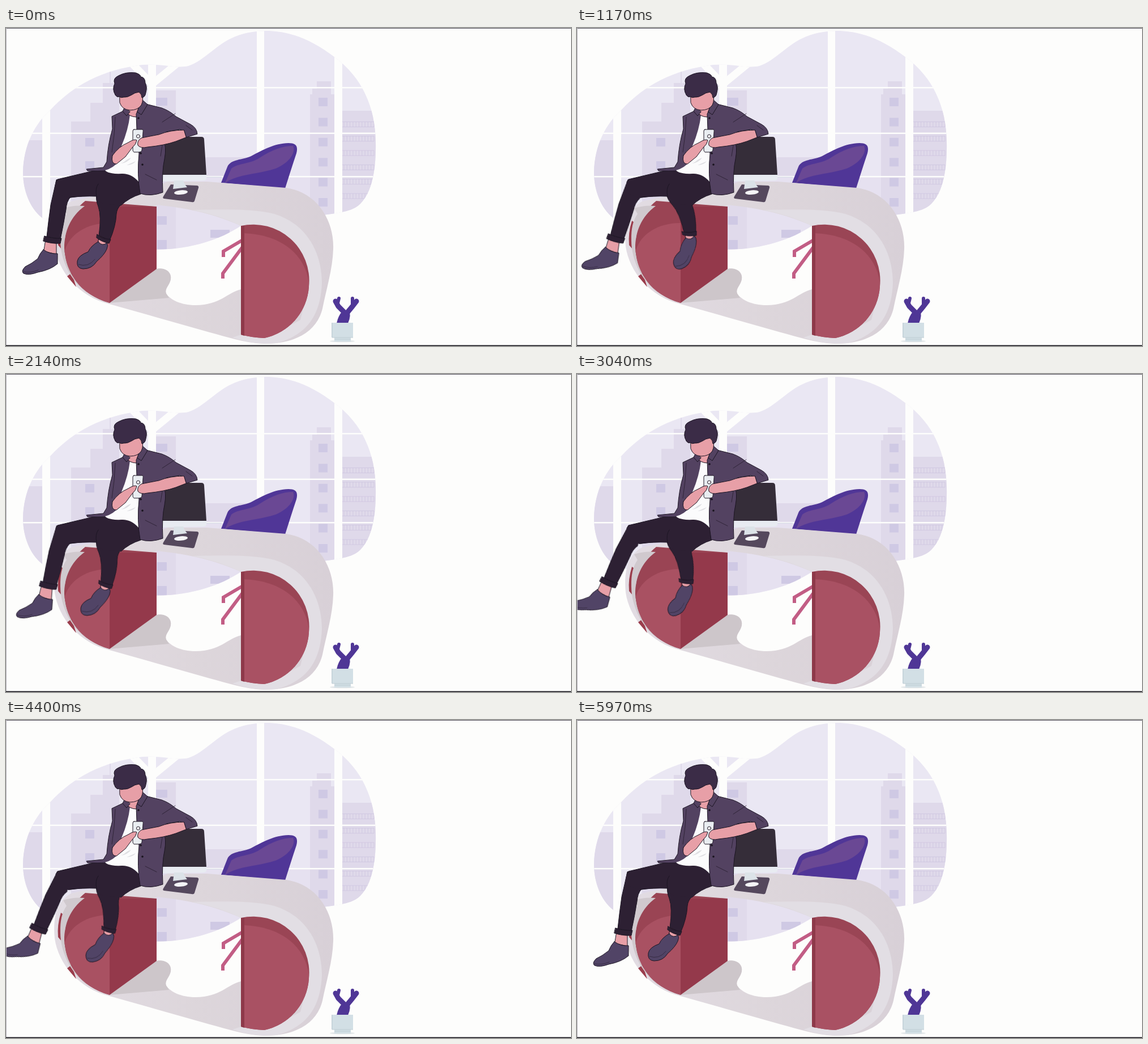
Write an HTML page that moves like this. It is 998 px wide and 561 px high and loops after 6 s.

```html
<!DOCTYPE html>
<html lang="en">
<head>
<meta charset="utf-8">
<title>Man on a desk</title>
<style>
html, body { margin: 0; width: 100%; height: 100%; overflow: hidden; background: #fdfdfc; }
svg { display: block; width: 998px; height: 561px; }
.ink { stroke: #1c1523; stroke-width: 1; stroke-linejoin: round; stroke-linecap: round; }
.line { fill: none; }
.pants { fill: #2d2033; }
.skin { fill: #e79fa7; }
.shoe { fill: #514466; }
.coat { fill: #534261; }
.win { fill: #cfc9e4; }
#far { transform-origin: 91px 275px; }
#near { transform-origin: 160px 298px; }
</style>
</head>
<body>
<svg viewBox="0 0 998 561">
  <defs>
    <clipPath id="cloud">
      <path d="M64 335C42 318 30 286 30 255C31 205 52 168 78 145C120 100 170 74 240 65C275 62 300 72 322 67C350 58 372 28 405 15C425 7 445 5 465 5C510 7 545 25 580 51C630 88 652 140 653 200C654 245 648 288 626 310C616 320 602 324 575 328L415 349C380 372 330 390 267 391L183 380Z"/>
    </clipPath>
    <linearGradient id="top" x1="0" x2="1">
      <stop offset="0" stop-color="#e2dce3"/>
      <stop offset=".5" stop-color="#ddd6db"/>
      <stop offset="1" stop-color="#d8d0d7"/>
    </linearGradient>
  </defs>

  <g clip-path="url(#cloud)">
    <path fill="#eae7f3" d="M0 0H700V420H0Z"/>
    <g fill="#dfd9ea">
      <path d="M30 198H64V340H30Z"/>
      <path d="M115 165H149V132H171V97H183V75H185V97H200V400H115Z"/>
      <path d="M265 110H300V228H443V262H300V400H265Z"/>
      <path d="M537 117H541V107H549V94H574V117H580V340H537Z"/>
      <path d="M594 146H660V330H594Z"/>
      <path d="M200 262H537V400H200Z" opacity=".45"/>
    </g>
    <g id="windows" class="win"></g>
    <g id="rails" fill="none" stroke="#cfc6e0" stroke-width=".8"></g>
    <g fill="#fdfdfc">
      <path d="M64 0H78V400H64ZM251 0H265V300H251ZM443 0H456V300H443ZM580 0H594V400H580Z"/>
      <path d="M0 104H700V106.500H0ZM0 184.500H700V187H0ZM0 261H700V263.500H0Z"/>
    </g>
    <path fill="none" stroke="#fdfdfc" stroke-width="13" d="M218 58L258 99L308 58"/>
  </g>

  <g fill="none" stroke="#c25d85" stroke-width="6">
    <path d="M418 374L384 394V404M418 386L383 433V442"/>
  </g>

  <path fill="#503697" d="M380 273L391 245C397 231 418 233 433 226C456 214 473 204 499 203C513 203 516 209 513 221Q505 245 493 283Z"/>
  <path fill="#6a4894" d="M387 273L398 248C410 238 432 240 448 229C470 215 488 208 507 208C513 220 499 239 476 248C446 258 411 257 387 273Z"/>

  <!-- desk -->
  <path fill="url(#top)" fill-rule="evenodd" d="M115 306Q170 292 240 292L285 271L355 271L495 282C550 290 580 340 578 390C577 425 566 460 559 495C548 540 505 557 455 557C420 555 390 545 360 537L183 487C130 475 92 430 86 385C82 345 92 318 115 306Z
    M266 312Q325 318 370 332Q395 340 415 349V461C392 466 378 489 335 489C308 489 291 479 284 470C277 460 293 452 291 438C289 428 277 423 266 425Z"/>
  <path fill="#e2dee4" d="M330 321C390 320 435 319 474 328C530 345 558 395 558 450C556 500 537 540 478 556C450 559 420 553 400 546L415 541L460 547L520 515L535 455L500 372L415 349Q375 330 330 321Z"/>
  <path fill="#cdc6ca" d="M183 485L266 425C278 422 290 428 291 438C293 452 277 460 284 470L288 476Z"/>

  <path fill="#9a4555" d="M415 349A99 99 0 0 1 535 456A99 99 0 0 1 456 547Q434 546 415 541Z"/>
  <path fill="#a95163" d="M420 362C470 364 510 384 528 424Q535 440 535 456A99 99 0 0 1 456 547Q434 546 420 542Z"/>
  <path fill="#8e394a" d="M415 349H421V543L415 541Z"/>

  <path fill="#9a4454" d="M140 305L265 315L183 485C130 470 103 430 103 384C104 350 117 323 140 305Z"/>
  <path fill="#a95162" d="M183 344V485C130 470 104 430 104 392C113 363 143 344 183 344Z"/>
  <path fill="#94394b" d="M183 315H266V425L183 485Z"/>
  <path fill="#9b3d4c" d="M97 340Q90 362 92 383L104 397V345ZM108 438L124 457L116 432Z"/>
  <path fill="#d0c9ce" d="M101 318Q120 312 139 314C113 333 103 360 103 388C104 425 125 455 150 472C115 450 96 410 96 375Q95 344 107 328Z"/>

  <!-- desktop objects -->
  <path fill="#352d39" d="M270 192H345Q350 192 350 197L354 259H270Z"/>
  <path fill="#e8ebf1" d="M270 259H354V265Q354 269 349 269L270 271Z"/>
  <path stroke="#cad0df" d="M354 263H381"/>
  <path fill="#55485d" d="M291 276L338 278Q341 279 340 282L333 305Q332 308 328 307L279 301Q276 300 278 297Z"/>
  <path fill="#dce3e8" d="M297 269H313L316 276L320 281L295 284Z"/>
  <ellipse cx="309" cy="290" rx="12" ry="3.800" fill="#f4f4f6" transform="rotate(-5 309 290)"/>

  <!-- plant -->
  <ellipse cx="594" cy="552.500" rx="22" ry="1.800" fill="#e0e5e7"/>
  <g fill="#4f3696" stroke="#4f3696" stroke-linecap="round" stroke-linejoin="round">
    <path stroke="none" d="M584 521Q587 506 595 499H606Q610 508 604 521Z"/>
    <path fill="none" stroke-width="9" d="M599 503L587 491L582 482M602 503L612 491L619 482"/>
    <path fill="none" stroke-width="6" d="M586 485L588 477M612 488V477"/>
  </g>
  <path fill="#d2dfe5" d="M575 520H613V546H609V553H580V546H575Z"/>
  <path fill="none" stroke="#bccbd2" d="M576 520V546H613M580 549H609"/>

  <!-- man -->
  <g id="far" class="ink">
    <path class="skin" d="M70 375H89V399L67 394Z"/>
    <path class="shoe" d="M66 391Q60 397 56 407Q45 416 34 421Q26 429 31 433Q40 437 56 431Q78 427 91 416V398Q77 399 66 391Z"/>
    <path class="line" d="M31 430Q43 433 57 427" opacity=".5"/>
    <path class="pants" d="M89 268Q84 290 79 312Q75 340 72 368L96 373Q102 345 106 320Q107 306 114 298L112 268Z"/>
    <path class="pants" d="M68 367Q83 372 98 371L96 380Q80 381 66 376Z"/>
  </g>
  <g id="near" class="ink">
    <path class="skin" d="M165 368L180 375L177 388L162 381Z"/>
    <path class="shoe" d="M163 377Q150 384 145 395Q128 401 126 411Q124 424 136 425Q152 425 160 412Q174 400 178 390Q181 384 178 379Q170 386 163 377Z"/>
    <path class="line" d="M128 417Q145 423 157 408" opacity=".5"/>
    <path class="pants" d="M160 292Q158 303 163 315Q169 332 164 366L183 375Q194 350 195 328Q196 318 203 312L202 288Z"/>
    <path class="pants" d="M161 364Q169 372 185 373L182 380Q168 377 160 370Z"/>
  </g>

  <path class="pants" d="M180 247L150 253Q116 261 91 267Q84 278 86 290L110 300Q135 296 160 297Q163 306 172 310L203 313Q218 299 238 293L236 255Z"/>
  <path class="ink line" d="M178 248L150 253Q116 261 91 267L88 272M112 299Q135 296 160 297M160 297Q157 283 163 275M203 313Q218 299 238 293"/>

  <path class="coat ink" d="M206 147L187 156L188 178Q180 205 178 236L172 246L142 249L144 252Q180 253 205 250L222 152Z"/>
  <path fill="#fbfbfc" d="M219 153L230 156L234 200V271Q221 256 204 257Q181 258 175 251Q190 247 198 236L204 208Q216 180 219 153Z"/>
  <path fill="#dedee2" d="M203 239Q214 238 221 229Q214 231 209 236ZM213 242L229 235Q225 241 213 242Z"/>
  <path class="skin ink" d="M210 138L236 136L230 157Q218 157 211 147Z"/>
  <path class="coat ink" d="M240 131L251 135L275 141Q289 146 300 156L326 170Q337 176 338 187L318 193Q314 180 307 179L283 183L278 195Q284 210 280 231Q275 253 277 290Q255 298 237 292Q231 258 235 222L231 180L230 152Z"/>
  <path class="coat ink" d="M210 139L206 147L213 155L219 148ZM240 126L250 135L239 153L232 148Z"/>
  <path class="ink line" d="M276 166L299 151M193 157L191 188L187 219M278 195L273 226M246 258L266 268M318 172L329 180" opacity=".65"/>
  <g fill="#18131d">
    <circle cx="234" cy="159" r="1.800"/>
    <circle cx="238" cy="221" r="1.800"/>
    <circle cx="241" cy="241" r="1.800"/>
  </g>
  <path class="ink" fill="#e9edf1" d="M226 179H241Q243 180 242 184L240 216Q239 219 235 219H226Q224 218 224 215V182Q224 179 226 179Z"/>
  <circle class="ink" cx="233.500" cy="191" r="3" fill="#f7f7f8"/>
  <path class="skin ink" d="M188 225Q199 209 216 202Q227 195 231 198Q230 205 223 211L211 227L195 240Q185 240 188 225Z"/>
  <path class="skin ink" d="M314 180Q290 180 270 188L239 194Q231 199 233 207Q238 213 250 210Q280 207 300 200L318 193Z"/>

  <path class="skin ink" d="M201 112H239Q244 126 239 136Q233 145 219 145Q205 144 201 132Z"/>
  <path class="ink" fill="#3b2c47" d="M193 118Q187 108 192 98Q188 89 199 84Q212 77 229 79Q238 82 238 86Q246 87 246 97Q250 104 247 114Q246 122 240 123Q240 117 235 113Q227 114 222 118Q214 123 208 122Q203 124 200 121Q196 123 193 118Z"/>

  <path fill="#55515d" d="M0 0H998V1H0Z"/>
  <path fill="#b9b6be" d="M0 0H1V561H0Z"/>
  <path fill="#151219" d="M0 559.500H998V561H0Z"/>
</svg>
<script>
const get = id => document.getElementById(id);

const windows = [];
for (let i = 0; i < 6; i++) windows.push([552, 123 + i * 35.4, 16, 15]);
windows.push([140, 194, 16, 15], [140, 235, 16, 15], [265, 123, 20, 14],
  [267, 332, 17, 15], [267, 374, 17, 16], [361, 356, 34, 14]);
get('windows').innerHTML = windows
  .map(([x, y, w, h]) => `<path d="M${x} ${y}h${w}v${h}h${-w}z"/>`).join('');

let rails = '';
for (let row = 0; row < 6; row++) {
  const y = 165.500 + row * 25.3;
  rails += `M594 ${y}H650M594 ${y + 9}H650`;
  for (let x = 597; x < 651; x += 5.3) rails += `M${x} ${y}v9`;
}
get('rails').innerHTML = `<path d="${rails}"/>`;

// One pose per second, in degrees around the knee
const swing = (id, angles) => get(id).animate(
  angles.map(a => ({ transform: `rotate(${a}deg)`, easing: 'ease-in-out' })),
  { duration: 6000, iterations: Infinity });

swing('far', [0, 8.2, 3.6, 15.5, 13.3, 16.4, 0]);
swing('near', [0, -23, -2.5, -17, -5.5, -11.5, 0]);
</script>
</body>
</html>
```
